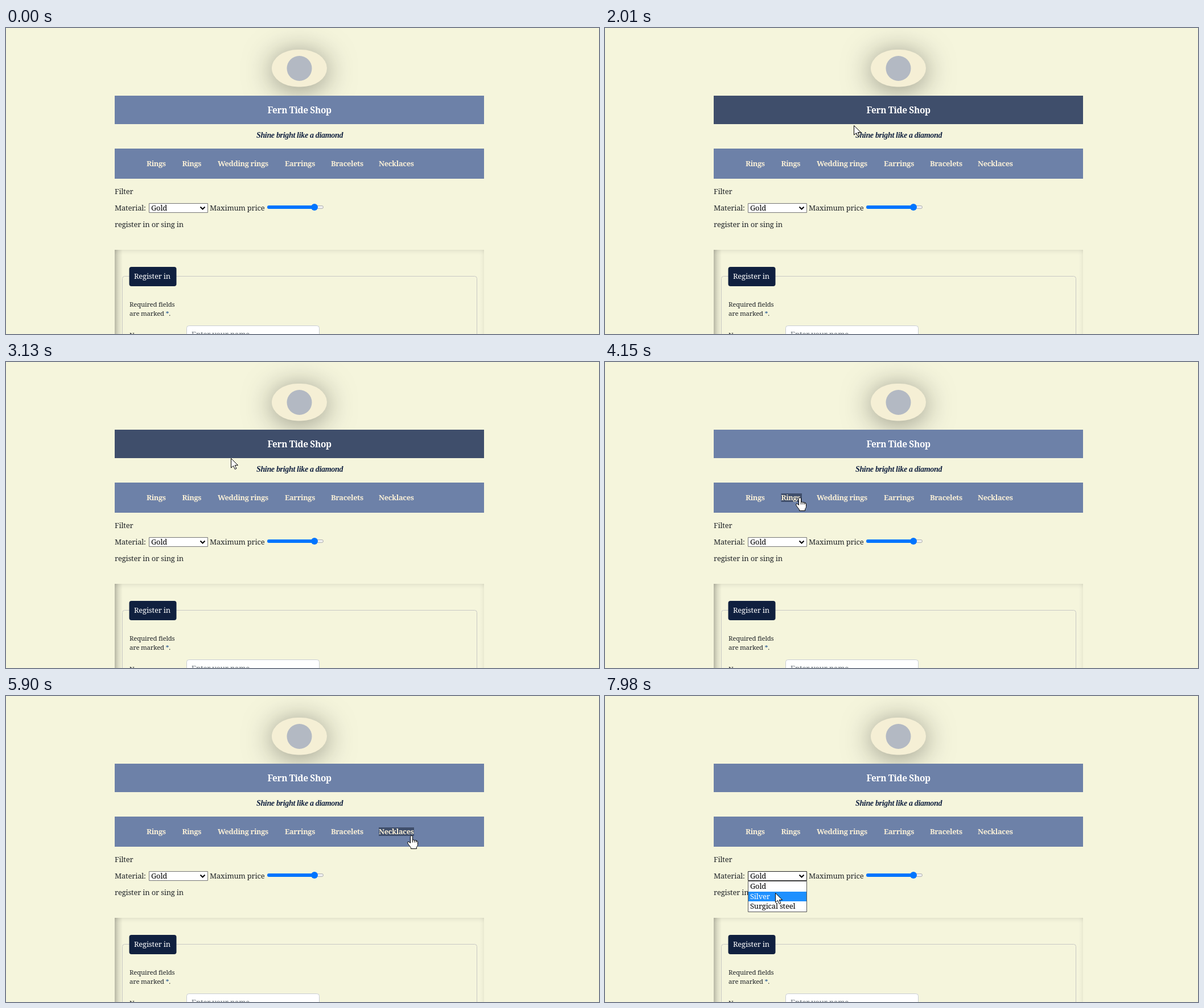
An HTML page with a canvas that plays this animation: 1042 by 538 pixels, repeating every 8 s.

```html
<!DOCTYPE html>
<html lang="en">
<head>
<meta charset="utf-8">
<title>Jewellery shop</title>
<style>
  html, body { margin: 0; width: 100%; height: 100%; overflow: hidden; background: #f5f5dc; }
  canvas { display: block; width: 1042px; height: 538px; }
</style>
</head>
<body>
<canvas id="stage" width="1042" height="538"></canvas>
<script>
const ctx = document.getElementById('stage').getContext('2d');
const LOOP = 8000, STEP = 70, OPEN_AT = 7220;
const BEIGE = '#f5f5dc', BLUE = '#6d81a8', DARK = '#3f4e6b', NAVY = '#10203f', INK = '#212529';
const SERIF = '"Noto Serif", "Liberation Serif", serif';

// [label, left, right]
const links = [
  ['Rings', 247, 283], ['Rings', 309.5, 346], ['Wedding rings', 372, 464],
  ['Earrings', 490, 545], ['Bracelets', 571, 629], ['Necklaces', 655, 717]
];
const options = ['Gold', 'Silver', 'Surgical steel'];

// Pointer path: [time, x, y]
const path = [
  [260, 935, 524], [330, 890, 486], [500, 800, 415], [600, 755, 369], [820, 700, 181],
  [960, 676, 157], [1100, 650, 130], [1240, 610, 98], [1400, 565, 70], [1550, 520, 78],
  [1700, 480, 112], [1870, 448, 149], [2010, 437, 171], [2200, 441, 227], [2350, 432, 276],
  [2500, 420, 230], [2710, 408, 160], [2920, 398, 103], [3060, 395, 150], [3130, 395, 169],
  [3300, 353, 212], [3540, 272, 234], [3610, 266, 236], [3870, 270, 237], [4150, 342, 238],
  [4450, 395, 232], [4640, 440, 230], [4710, 450, 235], [5000, 515, 238], [5200, 560, 239],
  [5490, 622, 236], [5700, 680, 240], [5900, 712, 245], [6000, 724, 262], [6150, 710, 300],
  [6320, 674, 327], [6700, 520, 325], [6900, 420, 319], [7150, 332, 314], [7360, 312, 316],
  [7560, 312, 316], [7980, 299, 346]
];

const arrow = new Path2D('M0 0V16.5L4 13L6.8 19L9.4 17.9L6.7 12H12Z');
const hand = new Path2D('M-2 2Q-2 0 0 0Q2 0 2 2V8Q4 6.5 5.3 8.5Q7 7.2 8.3 9.4Q11 8.6 11 11.5' +
  'V16Q11 18 9 20V23H-1V21Q-6 15-7 12.5Q-7 10-4.5 11L-2 13Z');

// The picture advances in steps, with two pauses in the movement
function stepped(t) {
  const start = t < 3870 ? 260 : t < 7560 ? 3870 : 7560;
  return start + Math.floor((t - start) / STEP + 1e-6) * STEP;
}

function pointer(t) {
  let i = 0;
  while (i < path.length - 2 && path[i + 1][0] <= t) i++;
  const [t0, x0, y0] = path[i], [t1, x1, y1] = path[i + 1];
  const k = Math.min(1, Math.max(0, (t - t0) / (t1 - t0)));
  return { x: x0 + (x1 - x0) * k, y: y0 + (y1 - y0) * k };
}

const inside = (p, x, y, r, b) => p.x >= x && p.x <= r && p.y >= y && p.y <= b;
const linkAt = p => links.findIndex(([, left, right]) => inside(p, left, 229, right, 247));

function rect(x, y, w, h, fill) {
  ctx.fillStyle = fill;
  ctx.fillRect(x, y, w, h);
}

function box(x, y, w, h, radius, fill, stroke) {
  ctx.beginPath();
  ctx.roundRect(x, y, w, h, radius);
  if (fill) { ctx.fillStyle = fill; ctx.fill(); }
  if (stroke) { ctx.strokeStyle = stroke; ctx.lineWidth = 1; ctx.stroke(); }
}

function text(str, x, y, { font = SERIF, size = 13, style = '', color = INK, gap = -0.2, align = 'left' } = {}) {
  ctx.font = `${style} ${size}px ${font}`;
  ctx.letterSpacing = gap + 'px';
  ctx.textAlign = align;
  ctx.fillStyle = color;
  ctx.fillText(str, x, y);
  return ctx.measureText(str).width;
}

function shade(x, y, w, h, fromX, fromY, toX, toY, alpha) {
  const g = ctx.createLinearGradient(fromX, fromY, toX, toY);
  g.addColorStop(0, `rgba(0,0,0,${alpha})`);
  g.addColorStop(0.45, `rgba(0,0,0,${alpha * 0.4})`);
  g.addColorStop(1, 'rgba(0,0,0,0)');
  rect(x, y, w, h, g);
}

function drawHeader(hot) {
  ctx.save();
  ctx.shadowColor = 'rgba(0,0,0,.42)';
  ctx.shadowBlur = 50;
  ctx.shadowOffsetY = 5;
  box(467, 38, 97, 65.5, { x: 46, y: 32.7 }, '#f5efd5');
  ctx.restore();
  ctx.fillStyle = '#b3b9c3';
  ctx.beginPath();
  ctx.arc(515.5, 71, 22, 0, Math.PI * 2);
  ctx.fill();

  rect(191, 119, 649, 50, hot ? DARK : BLUE);
  text('Fern Tide Shop', 515.5, 149.5, { size: 15.5, style: 'bold', color: '#fff', gap: -0.4, align: 'center' });
  text('Shine bright like a diamond', 516, 193,
    { font: '"Liberation Serif", serif', size: 14, style: 'italic bold', color: NAVY, gap: -0.33, align: 'center' });
}

function drawNav(hot) {
  rect(191, 212, 649, 53, BLUE);
  links.forEach(([label, left, right], i) => {
    if (i === hot) rect(left, 231, right - left, 15, DARK);
    text(label, left, 243, { size: 12.8, style: 'bold', color: '#faf0d7', gap: -0.35 });
  });
}

function drawFilter(open) {
  text('Filter', 191, 291.5);
  text('Material:', 191, 321);
  box(251.5, 308.5, 103, 16, 0, '#fff', open ? '#222' : '#767676');
  text('Gold', 255, 321, { color: '#000' });
  ctx.strokeStyle = '#000';
  ctx.lineWidth = 2;
  ctx.beginPath();
  ctx.moveTo(341.5, 314.5);
  ctx.lineTo(345.5, 318.5);
  ctx.lineTo(349.5, 314.5);
  ctx.stroke();

  text('Maximum price', 358, 321);
  box(459.5, 312.5, 98, 5, 2.5, '#efefef', '#b2b2b2');
  box(459, 312, 83, 6, 3, '#0075ff');
  ctx.beginPath();
  ctx.arc(542, 315, 6, 0, Math.PI * 2);
  ctx.fill();
  text('register in or sing in', 191, 349.5);
}

function drawForm() {
  shade(191, 390, 14, 148, 191, 0, 205, 0, 0.25);
  shade(191, 390, 649, 9, 0, 390, 0, 399, 0.07);
  shade(832, 390, 8, 148, 840, 0, 832, 0, 0.05);
  box(204.5, 436.5, 623, 160, 4, null, '#c8c8c4');
  box(216.5, 420, 83, 34, 4, NAVY);
  text('Register in', 225, 441, { color: '#fff' });

  const small = { size: 11.4 };
  text('Required fields', 217, 490, small);
  const w = text('are marked ', 217, 506, small);
  const star = text('*', 217 + w, 506, { size: 11.4, color: '#1a4f8f' });
  text('.', 217 + w + star, 506, small);
  text('Name:', 217, 543.5, small);
  box(317.5, 523.5, 233, 36, 4, '#fff', '#c9cdd2');
  text('Enter your name', 326, 543, { color: '#6c757d' });
}

function drawOptions(p) {
  const active = p.y > 343 ? 1 : 0;
  box(251.5, 325.5, 103, 54, 0, '#fff', '#555');
  options.forEach((label, i) => {
    const y = 326 + i * 17.6;
    if (i === active) rect(252, Math.round(y), 102, 17, '#1e90ff');
    text(label, 255, y + 13, { color: i === active ? '#fff' : '#000' });
  });
}

function drawPointer(p, overLink) {
  ctx.save();
  ctx.translate(Math.round(p.x) + 0.5, Math.round(p.y) + 0.5);
  const shape = overLink ? hand : arrow;
  ctx.fillStyle = '#fff';
  ctx.strokeStyle = '#000';
  ctx.lineWidth = 1;
  ctx.fill(shape);
  ctx.stroke(shape);
  if (overLink) {
    ctx.beginPath();
    for (const x of [2, 5.3, 8.3]) {
      ctx.moveTo(x, 8);
      ctx.lineTo(x, 12);
    }
    ctx.stroke();
  }
  ctx.restore();
}

function draw(t) {
  const now = stepped(t);
  const p = pointer(now);
  const before = pointer(now - STEP); // hover styles trail the pointer by one step
  const visible = t >= 260, open = t >= OPEN_AT;

  rect(0, 0, 1042, 538, BEIGE);
  drawHeader(visible && inside(before, 191, 119, 840, 169));
  drawNav(visible ? linkAt(before) : -1);
  drawFilter(open);
  drawForm();
  if (open) drawOptions(p);
  if (visible) drawPointer(p, linkAt(p) >= 0);
}

const start = performance.now();
function tick() {
  draw((performance.now() - start) % LOOP);
  requestAnimationFrame(tick);
}
tick();
</script>
</body>
</html>
```
